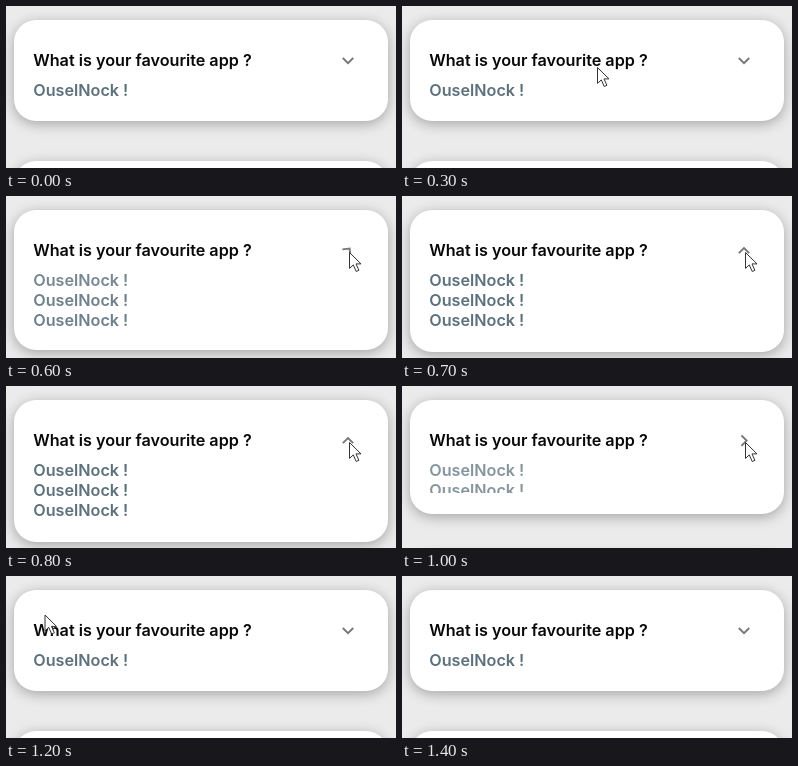
These frames come from a looping animation (390 by 162 pixels, 1.8 s). An HTML page:

```html
<!DOCTYPE html>
<html lang="en">
<head>
<meta charset="utf-8">
<title>Expanding answer card</title>
<style>
  html, body { margin: 0; width: 100%; height: 100%; overflow: hidden; background: #ebebeb; }
  #stage { position: relative; width: 390px; height: 162px; overflow: hidden; }
  .card {
    position: absolute; left: 8px; top: 14px; width: 374px; height: 101px;
    border-radius: 22px; background: #fff; box-shadow: 0 3px 13px rgba(0, 0, 0, .3);
  }
  svg { position: absolute; left: 0; top: 0; }
  text { font: 600 16.2px Inter, "Open Sans", sans-serif; }
  .title { fill: #080808; }
  .answer { fill: #5d717d; }
</style>
</head>
<body>
<div id="stage">
  <div class="card" id="card"></div>
  <div class="card" id="next"></div>
  <svg width="390" height="162" viewBox="0 0 390 162">
    <clipPath id="fold"><rect id="foldRect" x="20" y="70" width="350" height="24"/></clipPath>
    <text class="title" x="27.2" y="60">What is your favourite app ?</text>
    <g class="answer" clip-path="url(#fold)">
      <text id="first" x="27.2" y="90">OuselNock !</text>
      <g id="more">
        <text x="27.2" y="110">OuselNock !</text>
        <text x="27.2" y="130">OuselNock !</text>
      </g>
    </g>
    <path id="chevron" d="M-5.2-2.6 0 2.6 5.2-2.6" fill="none" stroke="#777" stroke-width="1.9"/>
    <path id="cursor" d="M.5.5V16.4L4.3 12.9 7.2 19.5 9.9 18.3 7 11.9H12Z"
          fill="#fff" stroke="#333" stroke-width="1" stroke-linejoin="round"/>
  </svg>
</div>
<script>
  const LOOP = 1800;
  const STEP = 100;
  const OPEN_AT = 495;
  const CLOSE_AT = 925;
  const CLOSED_HEIGHT = 101;
  const TRAVEL = 41;
  const GAP = 40;
  const $ = id => document.getElementById(id);

  const clamp = p => Math.min(1, Math.max(0, p));
  const ease = p => p * p * (3 - 2 * p);
  const progress = (time, start, duration) => clamp((time - start) / duration);
  const mix = (from, to, p) => from.map((value, i) => value + (to[i] - value) * p);

  // 0 closed, 1 open
  const toggle = (time, duration) =>
    ease(progress(time, OPEN_AT, duration)) - ease(progress(time, CLOSE_AT, duration));

  function pointer(time) {
    if (time < 100 || time >= 1400) return null;
    if (time < 500) return mix([38, 48], [195, 61], progress(time, 100, 200));
    if (time < 1100) return [343, 56];
    return mix([69, 48], [8, 29], progress(time, 1100, 200));
  }

  function draw(time) {
    const open = toggle(time, 120);
    const turn = toggle(time, 150);
    const tip = pointer(time);
    const height = CLOSED_HEIGHT + TRAVEL * open;

    $('card').style.height = height + 'px';
    $('next').style.top = 14 + height + GAP + 'px';
    $('foldRect').setAttribute('height', height - 77);
    $('first').setAttribute('opacity', 1 - turn * (1 - turn));
    $('more').setAttribute('opacity', (1 + turn) / 2);
    $('chevron').setAttribute('transform', `translate(342 54.6) rotate(${-180 * turn})`);
    $('cursor').style.display = tip ? '' : 'none';
    if (tip) $('cursor').setAttribute('transform', `translate(${tip})`);
  }

  const start = performance.now();
  function tick() {
    const time = (performance.now() - start) % LOOP;
    draw(Math.floor(time / STEP) * STEP);
    requestAnimationFrame(tick);
  }
  tick();
</script>
</body>
</html>
```
